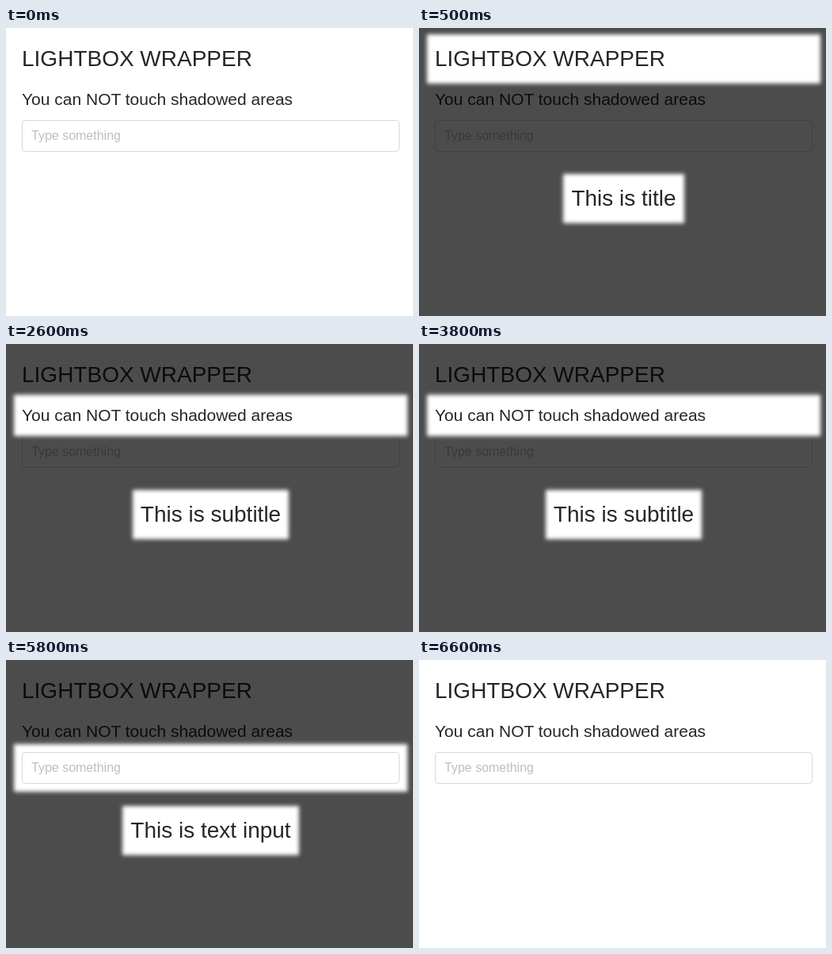
These frames come from a looping animation (514x363 px, 7.6 s). An HTML page:

```html
<!DOCTYPE html>
<html lang="en">
<head>
<meta charset="utf-8">
<title>Lightbox wrapper</title>
<style>
  html, body { margin: 0; width: 100%; height: 100%; overflow: hidden; background: #fff; }
  body { position: relative; font: 14px/1.5 "Liberation Sans", Arial, sans-serif; color: rgba(0, 0, 0, .85); }
  .step, .tip { position: absolute; left: 20px; width: 477px; }
  .title { top: 18px; font-size: 28px; }
  .subtitle { top: 74px; font-size: 21px; }
  .field { top: 116px; height: 40px; }
  .field div {
    box-sizing: border-box; height: 40px; padding: 0 11px;
    border: 1px solid #d9d9d9; border-radius: 4px;
    font-size: 16px; line-height: 38px; color: #bfbfbf;
  }
  .shade { position: absolute; inset: 0; z-index: 1; background: rgba(0, 0, 0, .7); }
  .tip { top: 194px; z-index: 2; font-size: 28px; text-align: center; }
  .tip span { display: inline-block; }
  .lit { z-index: 2; background: #fff; box-shadow: 0 0 5px 10px #fff; }
  [hidden] { display: none; }
</style>
</head>
<body>
<div class="step title">LIGHTBOX WRAPPER</div>
<div class="step subtitle">You can NOT touch shadowed areas</div>
<div class="step field"><div>Type something</div></div>
<div class="shade" hidden></div>
<div class="tip" hidden><span class="lit"></span></div>
<script>
  const LOOP = 7600;
  const starts = [500, 2600, 4600, 6600];
  const labels = ['This is title', 'This is subtitle', 'This is text input'];
  const steps = document.querySelectorAll('.step');
  const shade = document.querySelector('.shade');
  const tip = document.querySelector('.tip');
  const origin = performance.now();
  let shown = -1;

  function show(active) {
    steps.forEach((step, i) => step.classList.toggle('lit', i === active));
    shade.hidden = tip.hidden = !(active in labels);
    tip.firstChild.textContent = labels[active] || '';
    shown = active;
  }

  function tick() {
    const time = (performance.now() - origin) % LOOP;
    const active = starts.filter(start => time >= start).length - 1;
    if (active !== shown) show(active);
    requestAnimationFrame(tick);
  }
  tick();
</script>
</body>
</html>
```
